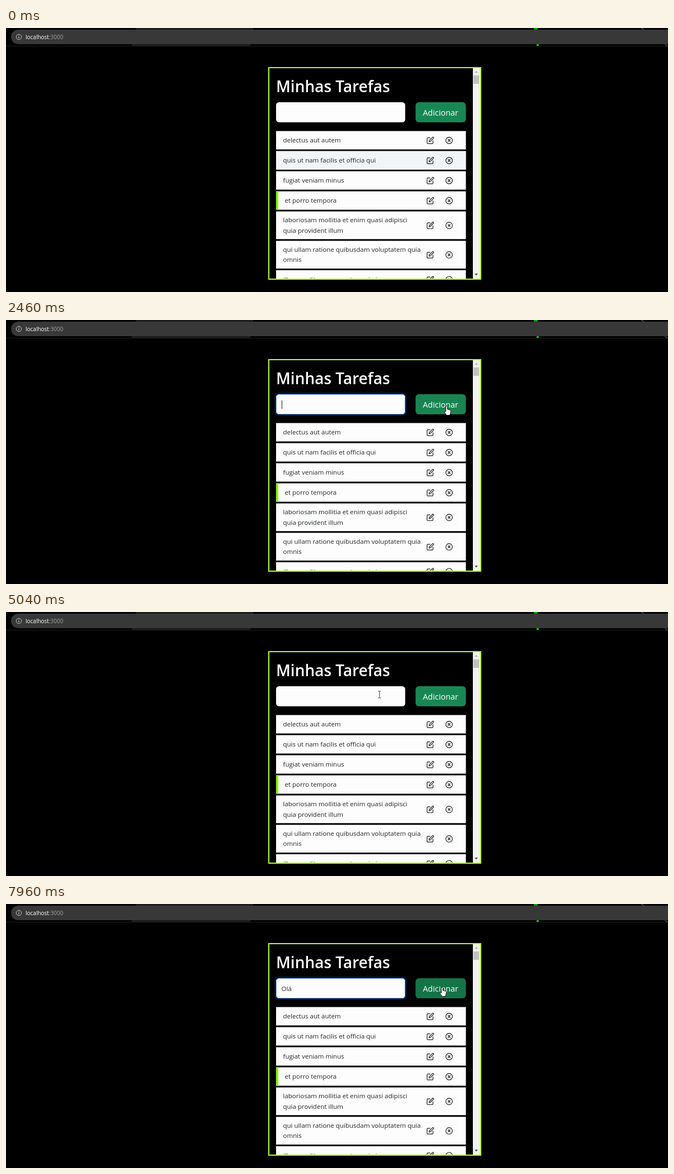
An HTML page for the animation above (8 s loop, 1184 by 473 pixels).

```html
<!DOCTYPE html>
<html lang="pt">
<head>
<meta charset="utf-8">
<title>Minhas Tarefas</title>
<style>
  html, body { margin: 0; width: 100%; height: 100%; overflow: hidden; background: #000; }
  svg { display: block; font-family: "Open Sans", "Noto Sans", sans-serif; }
  text { white-space: pre; }
</style>
</head>
<body>
<svg width="1184" height="473" viewBox="0 0 1184 473">
  <defs>
    <clipPath id="view"><rect x="471" y="72" width="364" height="377"/></clipPath>
    <g id="icons" fill="none" stroke="#1b1e21" stroke-linecap="round" stroke-linejoin="round">
      <g transform="translate(752 -7) scale(.58)" stroke-width="2.1">
        <path d="M11 4H4a2 2 0 0 0-2 2v14a2 2 0 0 0 2 2h14a2 2 0 0 0 2-2v-7"/>
        <path d="M18.5 2.5a2.12 2.12 0 0 1 3 3L12 15l-4 1 1-4z"/>
      </g>
      <circle cx="792.5" r="5.8" stroke-width="1.2"/>
      <path d="M790.6-1.9l3.8 3.8m0-3.8l-3.8 3.8" stroke-width="1.3"/>
    </g>
  </defs>
  <rect width="1184" height="473"/>

  <!-- browser bar -->
  <path d="M232 0h210v3H232zM225 29h212v3H225z" fill="#1c1c1c"/>
  <path d="M0 32.5h1184" stroke="#1c2416"/>
  <path d="M944 0h7v3h-7z" fill="#0a9a0a"/>
  <path d="M949 29h4v3h-4z" fill="#12c412"/>
  <path d="M1136 0l5 3M1177 28l6 4.5" stroke="#6d6d78"/>
  <rect x="9" y="3" width="1200" height="26" rx="13" fill="#383838"/>
  <circle cx="23" cy="16" r="4.7" fill="none" stroke="#c8c8c8"/>
  <path d="M23 15.5v3M23 13v1.2" stroke="#c8c8c8" stroke-width="1.2"/>
  <text x="35" y="19.7" font-size="10" fill="#fff">localhost<tspan fill="#a0a0a0">:3000</tspan></text>

  <!-- task panel -->
  <rect x="470" y="71" width="379" height="379" stroke="#adff2f" stroke-width="2"/>
  <text x="483" y="114.5" font-size="28" font-weight="600" fill="#fff">Minhas Tarefas</text>
  <rect id="glow" x="480" y="130" width="237" height="42" rx="8" fill="#03193c"/>
  <rect x="483" y="133" width="231" height="36" rx="5.5" fill="#fdfdfd"/>
  <rect id="ring" x="483.5" y="133.5" width="230" height="35" rx="5" fill="none" stroke="#86b7fe"/>
  <text id="typed" x="492.5" y="155.5" font-size="11.53" fill="#212529"></text>
  <path id="caret" d="M0 144v15" stroke="#111"/>
  <rect x="732.5" y="133" width="90" height="36" rx="6" fill="#198754"/>
  <rect id="shade" x="732.5" y="133" width="90" height="36" rx="6" opacity="0"/>
  <text x="745.5" y="157" font-size="14.4" fill="#fff">Adicionar</text>
  <g id="list" clip-path="url(#view)" font-size="11.53" fill="#212529"></g>
  <path d="M835 72h13v377h-13z" fill="#f1f1f1"/>
  <path d="M836 85h10v15h-10z" fill="#c1c1c1"/>
  <path d="M838 80l3-3 3 3z" fill="#a3a3a3"/>
  <path d="M838 440l3 3.5 3-3.5z" fill="#505050"/>

  <!-- alert -->
  <g id="alert" opacity="0">
    <rect x="488" y="29.5" width="342.5" height="100" rx="4" fill="#202326" stroke="#34373a"/>
    <text x="500.5" y="54.4" font-size="10.9" fill="#e8eaed">localhost:3000 diz</text>
    <text x="500.5" y="76" font-size="9.5" fill="#e8eaed">Campo obrigatório</text>
    <rect x="769" y="93" width="48.5" height="23" rx="2.5" fill="#7fa4e3" stroke="#3c68b8" stroke-width="2"/>
    <text x="793" y="107.4" font-size="9" font-weight="600" text-anchor="middle" fill="#202124">OK</text>
  </g>

  <!-- pointers -->
  <g id="pointer">
    <path id="beam" d="M-2.5-6H-.6L0-5.4.6-6H2.5M0-5.4V5.4M-2.5 6H-.6L0 5.4.6 6H2.5" fill="none" stroke="#333"/>
    <path id="hand" transform="translate(-4.5 -.5)" d="M3.3 10.5V1.8a1.35 1.35 0 0 1 2.7 0V6.500l4.400 1c1 .3 1.600 1 1.500 2L11.200 14l-.9 3H4.600L1 12.200C.3 10.800 2 9.600 3.300 10.500z" fill="#fff" stroke="#000" stroke-width=".8"/>
    <path id="arrow" d="M0 0v13l3-2.700 2 4.700 2-.9-2-4.600h4z" fill="#fff" stroke="#000" stroke-width=".8"/>
  </g>
</svg>
<script>
const $ = id => document.getElementById(id);
const LOOP = 8000, DONE = 3, HOVERED = 1;

const tasks = [
  ["delectus aut autem"],
  ["quis ut nam facilis et officia qui"],
  ["fugiat veniam minus"],
  ["et porro tempora"],
  ["laboriosam mollitia et enim quasi adipisci", "quia provident illum"],
  ["qui ullam ratione quibusdam voluptatem quia", "omnis"],
  ["illo expedita consequatur quia in"]
];

function buildList() {
  let y = 184.6, html = "";
  tasks.forEach((lines, i) => {
    const height = lines.length > 1 ? 49.7 : 33, mid = y + height / 2;
    const box = (width, fill, id = "") =>
      `<rect id="${id}" x="483" y="${y}" width="${width}" height="${height}" fill="${fill}"/>`;
    html += box(339.5, "#fdfdfd");
    if (i === DONE) html += box(4, "#7fff00");
    if (i === HOVERED) html += box(339.5, "#f3f4f6", "hover");
    lines.forEach((line, n) => {
      const base = mid + 4.1 + (n - (lines.length - 1) / 2) * 18.3;
      html += `<text x="${i === DONE ? 498.5 : 495.5}" y="${base}">${line}</text>`;
    });
    html += `<use href="#icons" y="${mid + .3}"/>`;
    y += height + 3;
  });
  $("list").innerHTML = html;
}

// Pointer glides: start, end, then the place reached.
const glides = [
  [40, 790, 866, 215],
  [880, 1480, 704, 149],
  [2050, 2460, 788, 154],
  [2750, 3340, 795, 142],
  [3590, 3790, 790, 112],
  [4000, 4450, 668, 148],
  [6790, 7170, 824, 160],
  [7670, 7960, 780, 149]
];

const ramp = (t, start, length = 150) => Math.min(1, Math.max(0, (t - start) / length));
const smooth = k => k * k * (3 - 2 * k);
const show = (id, alpha) => $(id).setAttribute("opacity", +alpha);
const move = (id, x, y) => $(id).setAttribute("transform", `translate(${x} ${y})`);

function pointerAt(t) {
  let x = 800, y = 243;
  for (const [start, end, toX, toY] of glides) {
    const k = smooth(ramp(t, start, end - start));
    x += (toX - x) * k;
    y += (toY - y) * k;
  }
  return [x, y];
}

function drawField(t) {
  const glow = ramp(t, 2000) - ramp(t, 3220, 100) + ramp(t, 5170);
  show("glow", glow);
  show("ring", glow);

  const keyTimes = [6000, 6420, 7000].filter(k => k <= t);
  const word = "Olá".slice(0, keyTimes.length);
  const since = keyTimes.pop() || (t < 5170 ? 2000 : 5170);
  const focused = t >= 2000 && t < 3220 || t >= 5170;
  $("typed").textContent = word;
  show("caret", focused && (t - since) % 1000 < 500);
  move("caret", 493.5 + (word && $("typed").getComputedTextLength() - .5), 0);
}

function drawPointer(t) {
  const [x, y] = pointerAt(t);
  const inField = y > 133 && y < 169;
  const kind = inField && x > 483 && x < 714 ? "beam"
    : inField && x > 732 && x < 822 ? "hand" : "arrow";
  for (const id of ["beam", "hand", "arrow"]) show(id, id === kind);
  show("pointer", t >= 40);
  move("pointer", x, y);
}

function draw(t) {
  const closed = ramp(t, 4640);
  show("hover", 1 - ramp(t, 40));
  show("shade", .15 * (ramp(t, 2440) + ramp(t, 7690)) + .05 * ramp(t, 2990) - .2 * closed);
  show("alert", ramp(t, 3250, 105) - closed);
  move("alert", 0, 12 * ramp(t, 3250, 135) - 12);
  drawField(t);
  drawPointer(t);
}

function loop() {
  draw(performance.now() % LOOP);
  requestAnimationFrame(loop);
}
buildList();
loop();
</script>
</body>
</html>
```
